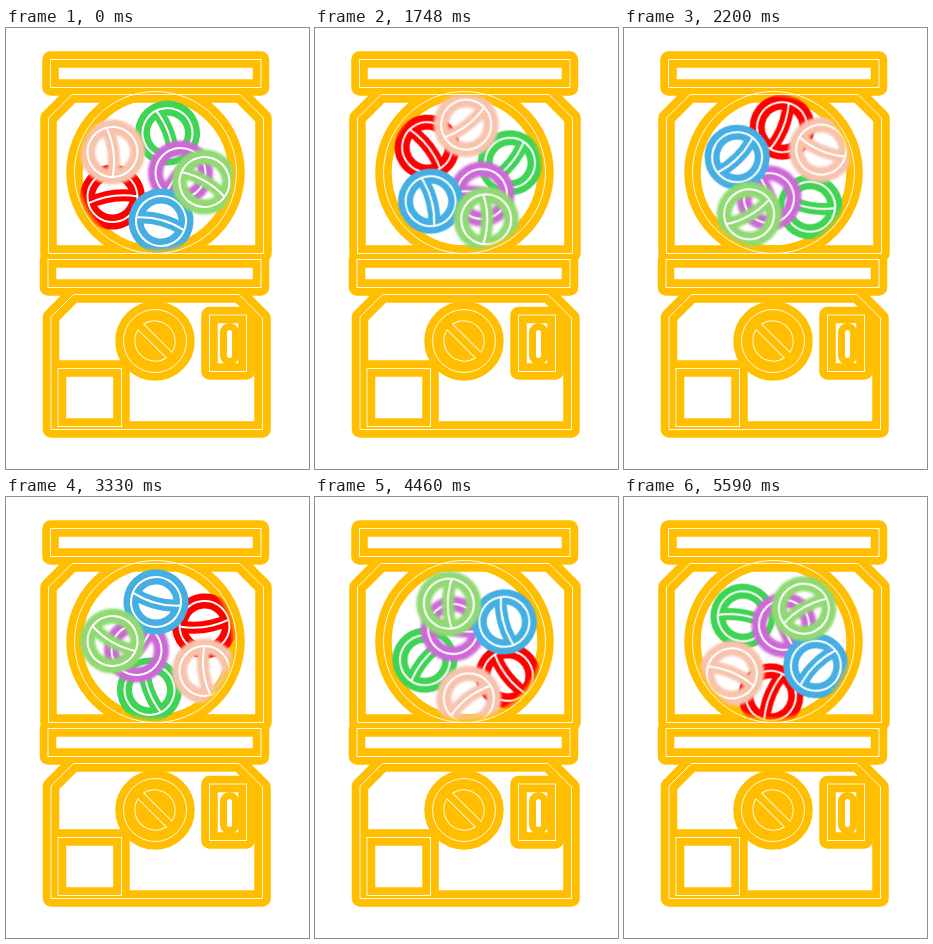
An HTML page for the animation above (6.72 s loop, 303x441 px).

```html
<!DOCTYPE html>
<html lang="en">
<head>
<meta charset="utf-8">
<title>Capsule machine</title>
<style>
  html, body { margin: 0; width: 100%; height: 100%; overflow: hidden; background: #fff; }
  svg { display: block; width: 303px; height: 441px; }
  .glow { fill: none; stroke: #ffbf00; stroke-width: 16.5; stroke-linejoin: round; }
  .glow .solid { fill: #ffbf00; }
  .glow .thin { stroke-width: 7; }
  .line { fill: none; stroke: #fff; stroke-width: 1; stroke-opacity: .9; }
  .ball { fill: none; }
  .ring { stroke-width: 15; }
  .band { stroke-width: 12; }
  .wire { stroke: #fff; stroke-width: 2; }
  .spin { transform-origin: 152.5px 149px; animation: turn 6720ms step-end infinite; }
  @keyframes turn {
    0% { transform: rotate(0deg); }
    15.92% { transform: rotate(60deg); }
    32.73% { transform: rotate(120deg); }
    49.55% { transform: rotate(180deg); }
    66.36% { transform: rotate(240deg); }
    83.18% { transform: rotate(300deg); }
    100% { transform: rotate(360deg); }
  }
</style>
</head>
<body>
<svg viewBox="0 0 303 441">
  <defs>
    <filter id="soft" x="-30%" y="-30%" width="160%" height="160%">
      <feGaussianBlur stdDeviation="1"/>
    </filter>
    <radialGradient id="fade">
      <stop offset=".92" stop-color="#fff"/>
      <stop offset="1" stop-color="#000"/>
    </radialGradient>
    <mask id="glass" maskUnits="userSpaceOnUse" x="0" y="0" width="303" height="441">
      <circle cx="149.5" cy="144.5" r="81" fill="url(#fade)"/>
    </mask>
    <g id="frame">
      <rect x="44.5" y="31.5" width="210.5" height="28"/>
      <path d="M42.5 225.5V90L66 66.5H234L257.5 90V225.5Z"/>
      <rect x="42" y="231.5" width="213" height="28"/>
      <path d="M45 401.5V289L67.5 266.5H233L256.5 290V401.5Z"/>
      <rect x="52" y="340.5" width="63.5" height="58"/>
      <rect x="203.5" y="287" width="37" height="56.5"/>
      <circle cx="149.5" cy="144.5" r="81"/>
    </g>
    <circle id="knob" cx="149" cy="313" r="31.5"/>
    <path id="half" d="M-20 -4A20.5 20.5 0 0 1 20 -4Z"/>
    <rect id="slot" x="217.5" y="298.5" width="12" height="35" rx="6"/>
  </defs>

  <g class="glow">
    <use href="#frame"/>
    <use href="#knob" class="solid"/>
    <use href="#slot" class="thin"/>
  </g>
  <g mask="url(#glass)">
    <g class="spin" id="balls"></g>
  </g>
  <g class="line">
    <use href="#frame"/>
    <use href="#knob"/>
    <use href="#half" transform="translate(149 313) rotate(45)"/>
    <use href="#half" transform="translate(149 313) rotate(225)"/>
  </g>
</svg>
<script>
  // Offsets are measured from the turning centre; tilt is the seam angle.
  const balls = [
    { color: "#ff0000", x: -46, y: 20, tilt: -8 },
    { color: "#3fd455", x: 9, y: -44, tilt: 70 },
    { color: "#cc69d6", x: 22, y: -4, tilt: -48, soft: true },
    { color: "#45aee2", x: 2.5, y: 44, tilt: 15 },
    { color: "#f7c3ad", x: -46, y: -25, tilt: 83, soft: true },
    { color: "#90d973", x: 46, y: 5, tilt: 30, soft: true }
  ];
  const seam = "M-25 3Q0 -5 25 3";

  document.getElementById("balls").innerHTML = balls.map(({ color, x, y, tilt, soft }) => `
    <g class="ball" transform="translate(${152.5 + x} ${149 + y}) rotate(${tilt})">
      <g stroke="${color}" ${soft ? 'filter="url(#soft)"' : ""}>
        <circle class="ring" r="25"/>
        <path class="band" d="${seam}"/>
      </g>
      <circle class="wire" r="25"/>
      <path class="wire" d="${seam}"/>
    </g>`).join("");
</script>
</body>
</html>
```
